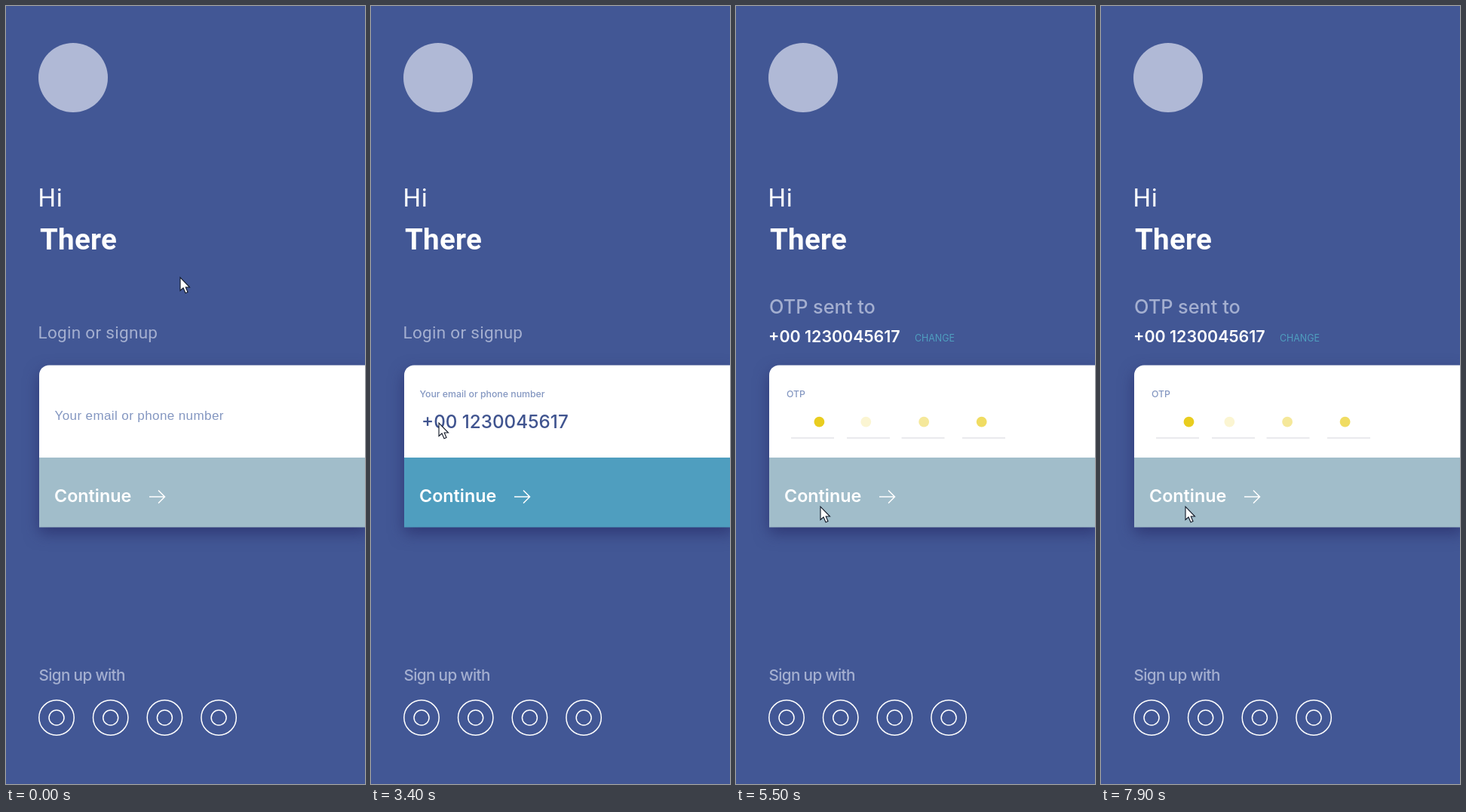
An HTML page that plays this animation: 476x1032 px, repeating every 8 s.

```html
<!DOCTYPE html>
<html lang="en">
<head>
<meta charset="utf-8">
<title>Login</title>
<style>
  html, body { margin: 0; width: 100%; height: 100%; overflow: hidden; background: #425795; }
  svg { display: block; width: 100%; height: 100%; }
  text { font-family: Inter, sans-serif; font-weight: 500; fill: #fff; white-space: pre; }
  .title { font-family: Roboto, sans-serif; font-weight: 400; }
  .plain { font-family: "Liberation Sans", Arial, sans-serif; font-weight: 400; }
  .muted { fill: #a4afd0; }
  .hint { fill: #8497c1; }
  .line { fill: none; stroke: #fff; stroke-width: 1.5; }
  #card { filter: drop-shadow(0 8px 10px rgba(32, 32, 92, .56)); }
</style>
</head>
<body>
<svg viewBox="0 0 476 1032">
  <circle cx="89" cy="95" r="46" fill="#b0b9d6"/>
  <text class="title" x="42.5" y="266" font-size="33" letter-spacing=".8">Hi</text>
  <text class="title" x="45" y="322.500" font-size="38.500" letter-spacing=".3" style="font-weight:700">There</text>

  <text id="login" class="title muted" x="42.500" y="441" font-size="22.500" letter-spacing=".3">Login or signup</text>
  <g id="sent">
    <text class="muted" x="44" y="407.500" font-size="25.300">OTP sent to</text>
    <text x="237" y="445" font-size="12.400" style="fill:#4f9ebf;font-weight:400">CHANGE</text>
  </g>
  <text id="sentNumber" x="43" y="446" font-size="21.400" style="font-weight:600">+00 1230045617</text>

  <g id="card">
    <path d="M44 600V489.500a13 13 0 0 1 13-13H480V600z" fill="#fff"/>
    <path id="button" d="M44 599H480V691.400H44z"/>
  </g>
  <text id="placeholder" class="plain hint" x="64.500" y="549" font-size="17" letter-spacing=".4">Your email or phone number</text>
  <text id="label" class="hint" x="64.500">Your email or phone number</text>
  <text id="number" x="67" y="560" font-size="24.200" style="fill:#40548f">+00 1230045617</text>

  <g id="otp">
    <text class="hint" x="67" y="519" font-size="12.300">OTP</text>
    <path d="M73 573h57M147 573h57M219.500 573h57M300 573h57" stroke="#e3e4e8" stroke-width="1.500"/>
    <g id="dots" fill="#e9cd1f"></g>
  </g>

  <text x="64" y="658" font-size="23.300" style="font-weight:600">Continue</text>
  <path class="line" d="M190 651H210M202 642.500L210.500 651 202 659.500"/>

  <text class="muted" x="43.500" y="894.500" font-size="20.700" letter-spacing="-.65">Sign up with</text>
  <g id="rings" class="line"></g>

  <path id="cursor" d="M0 0V17.500L4 14 7 20.800 10 19.500 7.200 13H12.500z" fill="#fff" stroke="#111827" stroke-width="1.100"/>
</svg>
<script>
const LOOP = 8000, TICK = 100;
const $ = id => document.getElementById(id);
const clamp = v => Math.min(1, Math.max(0, v));
const ramp = (t, start, length) => clamp((t - start) / length);
const mix = (a, b, p) => a + (b - a) * p;
const show = (id, alpha) => $(id).setAttribute('opacity', alpha);

function addCircle(parent, attributes) {
  const circle = document.createElementNS('http://www.w3.org/2000/svg', 'circle');
  for (const name in attributes) circle.setAttribute(name, attributes[name]);
  return $(parent).appendChild(circle);
}

for (let i = 0; i < 4; i++) {
  const cx = 67 + i * 71.7, cy = 944;
  addCircle('rings', { cx, cy, r: 23.2 });
  addCircle('rings', { cx, cy, r: 10 });
}

const slots = [102, 175, 252, 328.5];
const dots = [.2, .45, .7, 1].map(opacity => addCircle('dots', { cy: 551.7, r: 6.9, opacity }));

// Pointer stops: time, x, y
const stops = [
  [0, 231, 360], [100, 212, 401], [200, 212, 401], [700, 125, 634], [1100, 98, 556],
  [1200, 93, 556], [2000, 93, 556], [2100, 90, 553], [3700, 90, 553],
  [3800, 96, 578], [4200, 112, 664], [LOOP, 112, 664]
];

function pointerAt(t) {
  const i = stops.findIndex((stop, k) => k > 0 && t <= stop[0]);
  const [t0, x0, y0] = stops[i - 1], [t1, x1, y1] = stops[i];
  const p = (t - t0) / (t1 - t0);
  return [mix(x0, x1, p), mix(y0, y1, p)];
}

// Every dot hops to the next slot; the last one slides back to the first.
const HOP_START = 5400, HOP_EVERY = 602.5, HOP_TIME = 150;

function moveDots(t) {
  const hops = Math.max(0, Math.floor((t - HOP_START) / HOP_EVERY) + 1);
  const sinceHop = t - HOP_START - (hops - 1) * HOP_EVERY;
  const p = 1 - (1 - clamp(sinceHop / HOP_TIME)) ** 3;
  dots.forEach((dot, i) => {
    const to = (i + hops) % 4, from = hops ? (to + 3) % 4 : to;
    dot.setAttribute('cx', mix(slots[from], slots[to], p));
  });
}

function draw(t) {
  const typing = t >= 2030, submitted = t >= 4500;
  const lift = ramp(t, 2030, 300), swap = ramp(t, 4540, 300);

  $('button').setAttribute('fill', typing && !submitted ? '#4f9ebf' : '#a1bdca');
  show('placeholder', typing ? 0 : 1);
  show('label', typing ? 1 - ramp(t, 4500, 200) : 0);
  $('label').setAttribute('y', mix(549, 518.5, lift));
  $('label').setAttribute('font-size', mix(17.2, 12.3, lift));
  show('number', submitted ? 0 : lift);

  show('login', 1 - swap);
  show('sent', swap);
  show('sentNumber', ramp(t, 4650, 200));
  show('otp', ramp(t, 4500, 200));
  moveDots(t);
  $('cursor').setAttribute('transform', `translate(${pointerAt(t)})`);
}

const begin = performance.now();
function frame() {
  const t = (performance.now() - begin) % LOOP;
  draw(Math.floor(t / TICK) * TICK);
  requestAnimationFrame(frame);
}
frame();
</script>
</body>
</html>
```
